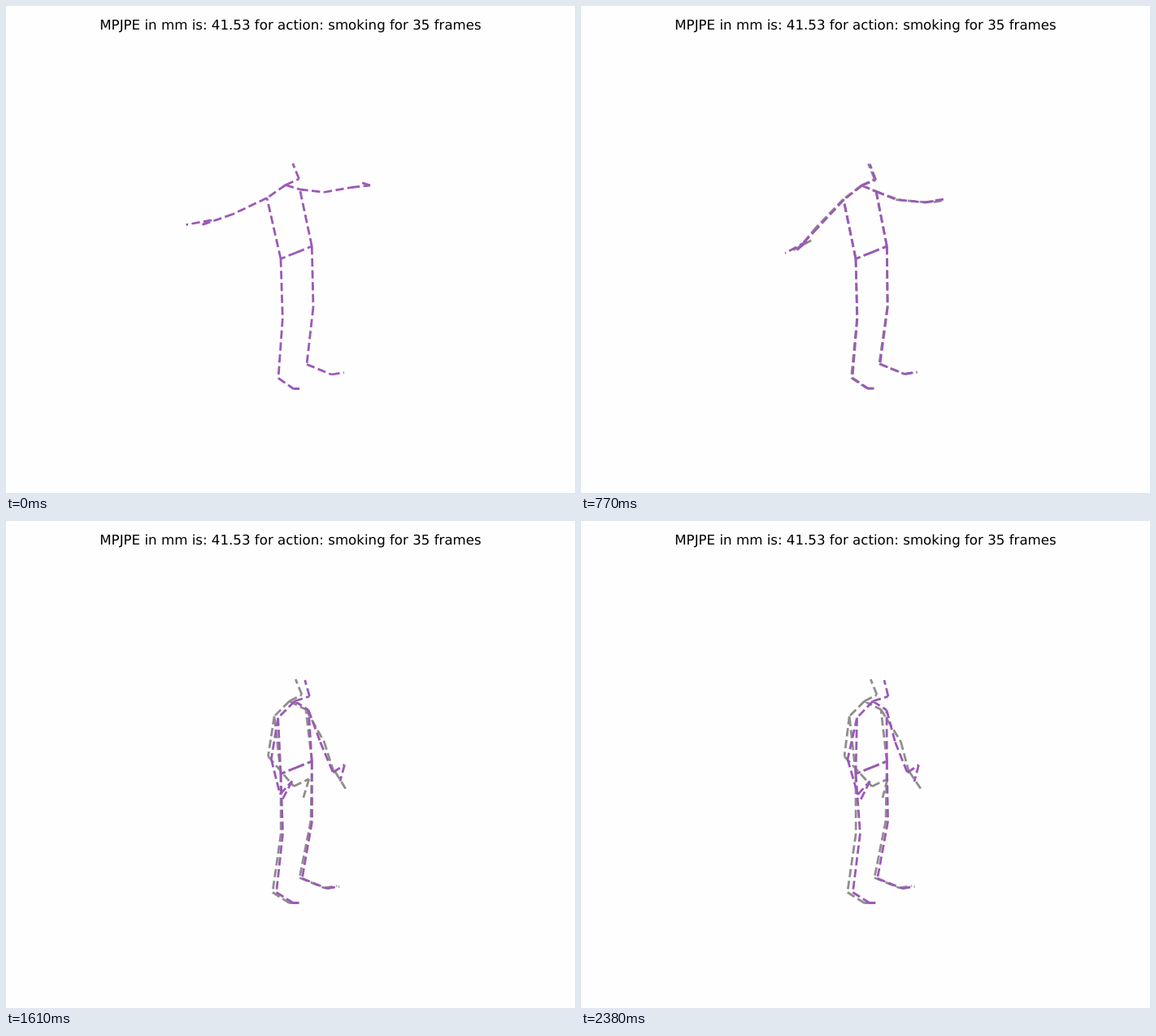
Write an HTML page that moves like this. It is 700x600 px and loops after 2.45 s.

```html
<!DOCTYPE html>
<html lang="en">
<head>
<meta charset="utf-8">
<title>Pose forecast</title>
<style>
  html, body { margin: 0; width: 100%; height: 100%; overflow: hidden; background: #fefefe; }
  svg { display: block; width: 700px; height: 600px; }
  text {
    font: 16.667px "DejaVu Sans", sans-serif;
    text-anchor: middle;
    text-rendering: geometricPrecision;
  }
  path { fill: none; stroke-width: 2.78; stroke-dasharray: 10.28 4.44; }
</style>
</head>
<body>
<svg viewBox="0 0 700 600">
  <text x="350" y="29">MPJPE in mm is: 41.53 for action: smoking for 35 frames</text>
  <path id="truth" stroke="#8e8e8e"/>
  <path id="guess" stroke="#9b59b6"/>
</svg>
<script>
const STEP = 70, COUNT = 35, SEEN = 10;

// S-curve from 0 at the first step to 1 at the last.
function ease(mid, width) {
  const s = t => 1 / (1 + Math.exp((mid - t) / width));
  const low = s(0), high = s(COUNT - 1);
  return t => (s(t) - low) / (high - low);
}

const drop = ease(12, 2), step = ease(12.5, 2.5), settle = ease(25, 2.5);
const inward = ease(16.3, 2);
const still = () => 0;

// How each body part eases in x and y, and any extra sideways motion.
const TRUNK = { guess: ease(19, 4.2), truth: ease(14, 2), y: drop };
const RIGHT = { guess: ease(14, 2.7), truth: ease(14, 2.7), y: ease(11.3, 2) };
const LEFT = {
  guess: inward, truth: inward, y: ease(13.2, 1.7),
  extra: { guess: still, truth: t => -4 * inward(t) * (1 - inward(t)) }
};
const LEG = {
  guess: step, truth: step, y: step,
  extra: { guess: settle, truth: still }
};

const joints = {};
function joint(name, part, start, guess, truth, amount = 0) {
  joints[name] = { part, start, guess, truth, amount };
}

joint('head', TRUNK, [352.8, 194], [373, 196], [356.3, 195]);
joint('neck', TRUNK, [360.5, 213], [378, 216], [364, 214]);
joint('chest', TRUNK, [344, 220.5], [359, 222], [348.7, 222]);
joint('shoulderR', TRUNK, [321, 236.5], [339.5, 242.5], [330.2, 240.5]);
joint('shoulderL', TRUNK, [361.5, 226], [376, 233], [369, 232.3]);

joint('elbowR', RIGHT, [279, 256.5], [328, 293.5], [324, 290]);
joint('wristR', RIGHT, [241.5, 269.5], [340.5, 337], [358, 327]);
joint('thumbR', RIGHT, [253, 263.8], [355.5, 320.5], [377, 318]);
joint('handR', RIGHT, [221.5, 269.5], [343, 345.5], [371, 341]);

joint('elbowL', LEFT, [391, 229.5], [386.5, 272.5], [393.5, 272], 16);
joint('wristL', LEFT, [425, 223.5], [401.5, 310], [403, 308], 8);
joint('thumbL', LEFT, [448, 221], [415.5, 300.5], [404, 309], 5);
joint('handL', LEFT, [437, 217.5], [410, 321], [418, 330], 7);

joint('kneeR', LEG, [340.3, 385], [339.2, 385], [338.2, 385], 4.2);
joint('ankleR', LEG, [335, 458.5], [331.7, 457.5], [327.8, 457.5], 2.7);
joint('kneeL', LEG, [378, 371], [376, 370], [375, 369], 1.6);
joint('ankleL', LEG, [370, 441.5], [364, 440.3], [361, 439.5], 0.7);

const BONES = [
  'pelvis hipR', 'hipR kneeR ankleR toeR tipR',
  'pelvis hipL', 'hipL kneeL ankleL toeL tipL',
  'hipL shoulderL elbowL wristL thumbL handL',
  'hipR shoulderR elbowR wristR thumbR handR',
  'chest shoulderR', 'chest shoulderL', 'chest neck head'
].flatMap(limb => {
  const names = limb.split(' ');
  return names.slice(1).map((name, i) => [names[i], name]);
});

const mix = (a, b, u) => a + (b - a) * u;
const shift = ([x, y], dx, dy) => [x + dx, y + dy];

function place({ part, start, amount, ...ends }, kind, t) {
  const end = ends[kind];
  const extra = amount && amount * part.extra[kind](t);
  return [
    mix(start[0], end[0], part[kind](t)) + extra,
    mix(start[1], end[1], part.y(t))
  ];
}

function pose(kind, t) {
  const p = { hipR: [338, 311.5], hipL: [376.3, 296], pelvis: [357.2, 303.7] };
  for (const name in joints) p[name] = place(joints[name], kind, t);
  p.toeR = shift(p.ankleR, 18.5 + 2 * step(t), 13);
  p.tipR = shift(p.toeR, 7.5, 0);
  p.toeL = shift(p.ankleL, 30.4, 12.5);
  p.tipL = shift(p.toeL, 15.4, -2.4);
  return p;
}

function draw(kind, t) {
  const p = pose(kind, t);
  const point = name => p[name].map(n => n.toFixed(2)).join(' ');
  const d = BONES.map(([a, b]) => `M${point(a)}L${point(b)}`).join('');
  document.getElementById(kind).setAttribute('d', d);
}

function render(ms) {
  const t = Math.floor(ms / STEP) % COUNT;
  draw('guess', t);
  draw('truth', t);
  // Both figures coincide until the forecast begins.
  document.getElementById('truth').style.display = t < SEEN ? 'none' : '';
}

const begin = performance.now();
function tick() {
  render(performance.now() - begin);
  requestAnimationFrame(tick);
}
tick();
</script>
</body>
</html>
```
